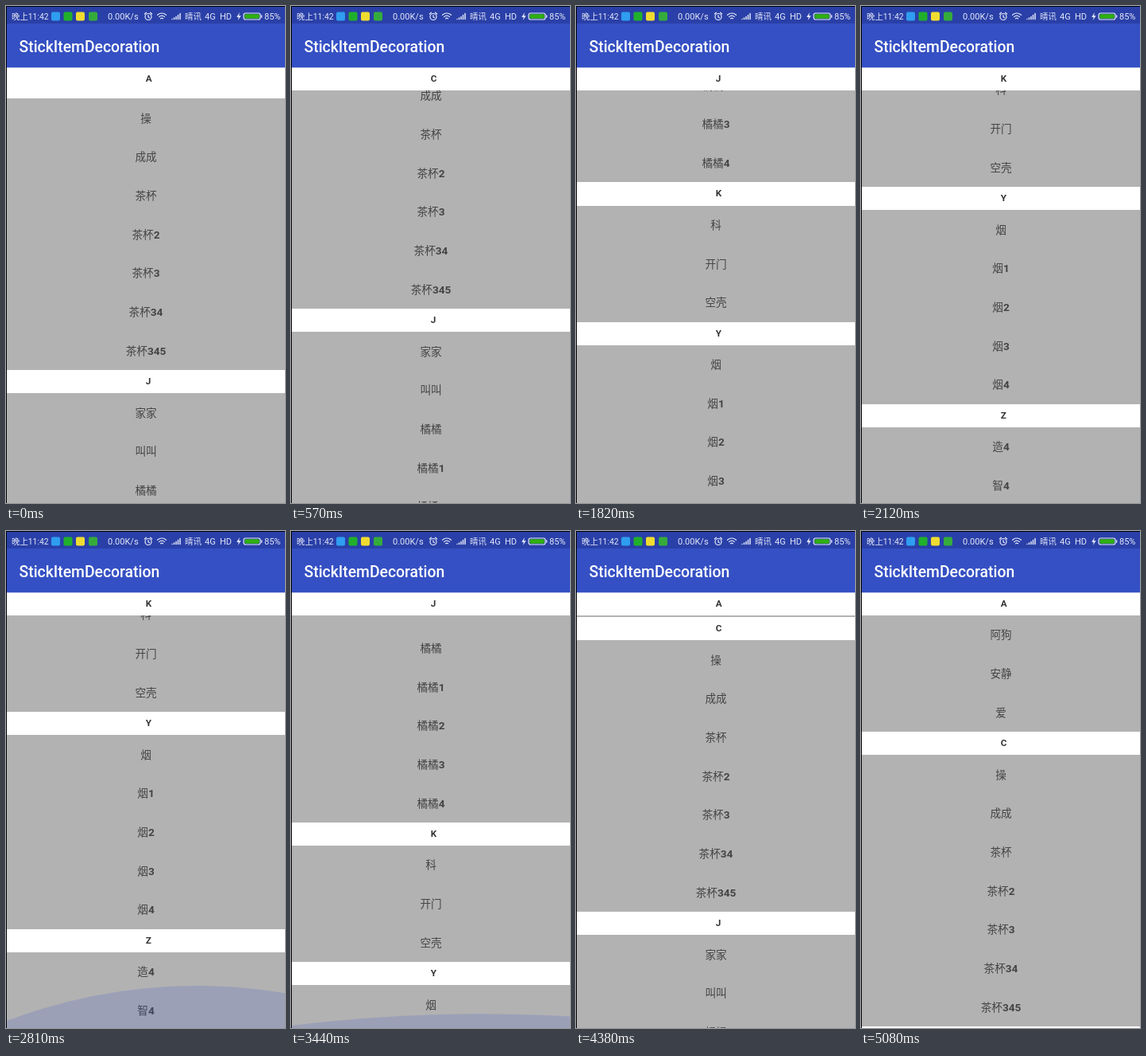
Recreate the animation shown at these times as an HTML page. Size 351x624 px, loop 5.17 s.

```html
<!DOCTYPE html>
<html lang="zh-CN">
<head>
<meta charset="utf-8">
<title>StickItemDecoration</title>
<style>
  html, body { margin: 0; width: 100%; height: 100%; overflow: hidden; background: #000; }
  svg { display: block; width: 351px; height: 624px; }
  rect.header { fill: #fff; shape-rendering: crispEdges; }
  text { font-family: Roboto, "Noto Sans CJK SC", "Noto Sans CJK JP", "Noto Sans CJK", sans-serif; }
  .row { font-size: 13.62px; font-weight: 500; fill: #444; text-anchor: middle; }
  .row tspan, .letter { font-weight: 700; }
  .letter { font-size: 11.7px; fill: #333; }
  .title { font-size: 19.35px; font-weight: 500; fill: #fff; }
  .status text { font-size: 11px; fill: #e4e8f8; }
  .status .han { font-size: 10.4px; }
  .line { fill: none; stroke: #e4e8f8; stroke-width: 1.2; stroke-linecap: round; }
  .glow { fill: rgb(50, 75, 205); fill-opacity: .17; }
</style>
</head>
<body>
<svg viewBox="0 0 351 624">
  <rect y="77" width="351" height="547" fill="#b2b2b2"/>
  <g id="list"></g>
  <rect class="header" y="77" width="351" height="29"/>
  <text id="sticky" class="letter" x="175.7" y="95"></text>
  <g id="bottomGlow"><circle class="glow" cx="240" cy="619" r="672"/></g>
  <g id="topGlow"><circle class="glow" cx="176" cy="619" r="672"/></g>

  <rect width="351" height="77.3" fill="#3550c4"/>
  <rect width="351" height="22" fill="#2a40a8"/>
  <text class="title" x="16.5" y="57.6">StickItemDecoration</text>
  <g class="status">
    <text class="han" x="7" y="17">晚上11:42</text>
    <rect x="57" y="7.5" width="11" height="11" rx="2" fill="#2f9df0"/>
    <rect x="72.5" y="7.5" width="11" height="11" rx="2" fill="#20b02c"/>
    <rect x="88" y="7.5" width="11" height="11" rx="2" fill="#f0dc30"/>
    <rect x="104" y="7.5" width="11" height="11" rx="2" fill="#35ab3c"/>
    <text x="128" y="17">0.00K/s</text>
    <g class="line">
      <circle cx="179" cy="13.5" r="4"/>
      <path d="M179 11.5v2.3l1.6 1M174.4 10l2-1.8M183.6 10l-2-1.8"/>
      <path d="M190.5 11.3q5.5-4.6 11 0M192.5 13.6q3.5-2.9 7 0M194.5 15.8q1.5-1.2 3 0"/>
      <path d="M209 16.5v0M211.5 16.5v-1.5M214 16.5v-3M216.5 16.5v-5M219 16.5v-7" stroke-width="1.5"/>
    </g>
    <text class="han" x="225" y="17">晴讯</text>
    <text x="250" y="17">4G</text>
    <text x="269" y="17">HD</text>
    <path d="M293.8 8l-3.6 6h2.5l-1 4 4-5.8h-2.6z" fill="#e4e8f8"/>
    <rect class="line" x="299" y="9" width="21" height="8" rx="2.5"/>
    <rect x="300.3" y="10.3" width="18.4" height="5.4" rx="1.2" fill="#30b010"/>
    <path class="line" d="M321.7 11.8v2.4"/>
    <text x="325" y="17">85%</text>
  </g>
  <path d="M0 0H351V1H1V624H0z" fill="#000"/>
</svg>
<script>
const LOOP = 5170, STEP = 136;
const TOP = 77, HEADER = 29.2, ROW = 48.67, GLOW = 53;

const groups = {
  A: '阿狗 安静 爱',
  C: '操 成成 茶杯 茶杯2 茶杯3 茶杯34 茶杯345',
  J: '家家 叫叫 橘橘 橘橘1 橘橘2 橘橘3 橘橘4',
  K: '科 开门 空壳',
  Y: '烟 烟1 烟2 烟3 烟4',
  Z: '造4 智4'
};

// Ends of the finger strokes: [step, scroll offset]
const strokes = [
  [0, 165], [3, 188], [4, 242], [9, 621], [11, 632], [13, 770.5],
  [15, 940], [21, 940], [29, 312], [31, 288], [33, 0]
];

const byId = id => document.getElementById(id);
const list = byId('list'), sticky = byId('sticky');
const clamp = x => Math.min(1, Math.max(0, x));

function add(tag, attrs, markup = '') {
  const el = document.createElementNS('http://www.w3.org/2000/svg', tag);
  for (const name in attrs) el.setAttribute(name, attrs[name]);
  el.innerHTML = markup;
  list.append(el);
}

let y = TOP;
const headers = Object.entries(groups).map(([letter, rows]) => {
  const header = { letter, y };
  add('rect', { class: 'header', y, width: 351, height: HEADER });
  add('text', { class: 'letter', x: 175.7, y: y + 18 }, letter);
  y += HEADER;
  for (const label of rows.split(' ')) {
    add('text', { class: 'row', x: 176, y: y + ROW / 2 + 4.9 }, label.replace(/\d+/, '<tspan>$&</tspan>'));
    y += ROW;
  }
  return header;
});

function scrollAt(step) {
  const next = strokes.findIndex(([end]) => end > step);
  if (next < 0) return strokes.at(-1)[1];
  const [[s0, y0], [s1, y1]] = strokes.slice(next - 1, next + 1);
  return y0 + (y1 - y0) * (step - s0) / (s1 - s0);
}

// The overscroll glow appears at once and sinks back over three steps.
function setGlow(id, edge, direction, step, from, end) {
  const size = step < from ? 0 : clamp((end - step) / 3);
  const glow = byId(id);
  glow.setAttribute('visibility', size ? 'visible' : 'hidden');
  glow.setAttribute('transform', `translate(0 ${edge}) scale(1 ${direction * (size || 1)})`);
}

function draw(t) {
  const step = Math.floor(t / STEP);
  const scroll = scrollAt(step);
  list.setAttribute('transform', `translate(0 ${-scroll})`);
  sticky.textContent = headers.findLast(h => h.y - scroll <= TOP).letter;
  setGlow('bottomGlow', 624, 1, step, 16, 26);
  setGlow('topGlow', TOP, -1, step, 33, 37);
}

const start = performance.now();
function tick(now) {
  draw(Math.max(0, now - start) % LOOP);
  requestAnimationFrame(tick);
}
draw(0);
requestAnimationFrame(tick);
</script>
</body>
</html>
```
